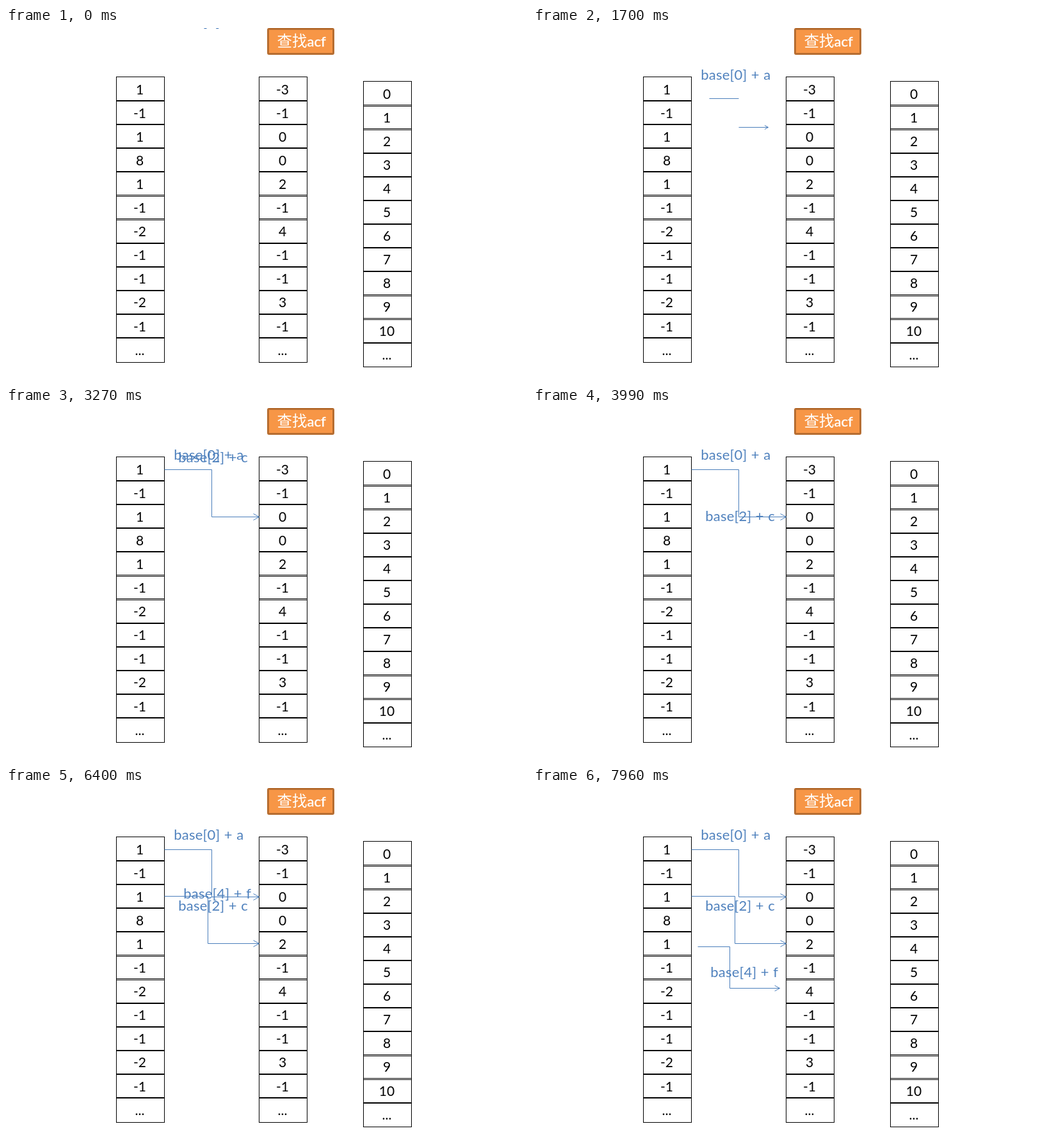
Write an HTML page that moves like this. It is 814x551 px and loops after 8 s.

```html
<!DOCTYPE html>
<html lang="zh">
<head>
<meta charset="utf-8">
<title>Double array lookup</title>
<style>
  html, body { margin: 0; width: 100%; height: 100%; overflow: hidden; background: #fff; }
  svg { display: block; width: 100%; height: 100%; }
  text { font-family: Lato, "Open Sans", sans-serif; }
  .cell { font-size: 21px; text-anchor: middle; fill: #000; }
  .label { font-size: 22px; letter-spacing: .2px; word-spacing: .6px; fill: #4f81bd; }
  .arrow { fill: none; stroke: #4a7ebb; stroke-width: 1; }
  .title { fill: #fff; font-size: 22px; stroke: #fff; stroke-width: .4; }
  .han { font-family: "Noto Sans CJK SC", "Noto Sans CJK", sans-serif; font-size: 23.5px; font-weight: 300; stroke: none; }
</style>
</head>
<body>
<svg id="stage" viewBox="0 0 814 551">
  <g id="tables"></g>
  <rect x="409.5" y="1.5" width="102" height="39" rx="1.5" fill="#f79646" stroke="#b66d31" stroke-width="3"/>
  <text class="title han" x="423.5" y="29">查找</text>
  <text class="title" x="470.5" y="28.5">acf</text>
  <g id="arrows"></g>
  <g id="labels"></g>
</svg>
<script>
const LOOP = 8000, TICK = 78, ZOOM_TICKS = 13.15;
const byId = id => document.getElementById(id);

function add(parent, tag, attrs, text) {
  const el = document.createElementNS("http://www.w3.org/2000/svg", tag);
  for (const key in attrs) el.setAttribute(key, attrs[key]);
  if (text) el.textContent = text;
  return parent.appendChild(el);
}

// Stacked cells; rounding jumps leave a gap in the two borders before them.
function drawColumn(x, top, jumps, values) {
  const g = byId("tables"), right = x + 75, bottom = top + 447;
  const hline = y => add(g, "rect", { x, y, width: 76, height: 1 });
  hline(top);
  hline(bottom);
  for (const side of [x, right]) add(g, "rect", { x: side, y: top, width: 1, height: 448 });
  for (let i = 0; i < values.length - 1; i++) {
    const y = top + 37 * (i + 1) + jumps.filter(j => i >= j).length;
    const split = jumps.some(j => i === j - 1 || i === j - 2);
    hline(y);
    hline(y + (split ? 2 : 1));
  }
  values.forEach((value, i) =>
    add(g, "text", { class: "cell", x: x + 37, y: top + 27.5 + 37.1 * i }, value));
}

drawColumn(172, 76, [6], [1, -1, 1, 8, 1, -1, -2, -1, -1, -2, -1, "..."].map(String));
drawColumn(395, 76, [6], [-3, -1, 0, 0, 2, -1, 4, -1, -1, 3, -1, "..."].map(String));
drawColumn(558, 83, [2, 10], [0, 1, 2, 3, 4, 5, 6, 7, 8, 9, 10, "..."].map(String));

// Each label drops to y at a steady speed, reaching it at tick "land"; its arrow then zooms in.
const steps = [
  { text: "base[0] + a", x: 262.3, y: 73, speed: 5.8, land: 14.3, zoom: 13.85, cy: 133, bend: 0 },
  { text: "base[2] + c", x: 269.3, y: 184.5, speed: 10.2, land: 52.5, zoom: 52.85, cy: 206.5, bend: -6 },
  { text: "base[4] + f", x: 277.3, y: 288, speed: 14.4, land: 90.5, zoom: 90.55, cy: 281, bend: -16 }
];
for (const step of steps) {
  step.arrow = add(byId("arrows"), "path", { class: "arrow" });
  step.label = add(byId("labels"), "text", { class: "label", x: step.x }, step.text);
}

const crisp = v => Math.floor(v) + .5;

function arrowPath(step, s) {
  if (s <= 0) return "";
  const cx = 321.5;
  const left = crisp(cx - 74 * s), right = crisp(cx + 73.5 * s);
  const mid = crisp(cx + step.bend * s);
  const y1 = crisp(step.cy - 37 * s), y2 = crisp(step.cy + 37 * s);
  const w = 9 * s, h = 5 * s;
  // The thin upright is lost while the arrow is still small.
  const upright = s < .65 ? "M" : "L";
  return `M${left} ${y1}H${mid}${upright}${mid} ${y2}H${right}` +
    `M${right - w} ${y2 - h}L${right} ${y2}L${right - w} ${y2 + h}`;
}

function render(t) {
  const tick = Math.floor((t + 16) / TICK);
  for (const step of steps) {
    const y = step.y - step.speed * Math.max(0, step.land - tick);
    step.label.setAttribute("y", y + 7.5);
    step.arrow.setAttribute("d", arrowPath(step, Math.min(1, (tick - step.zoom) / ZOOM_TICKS)));
  }
}

const start = performance.now();
function loop() {
  render((performance.now() - start) % LOOP);
  requestAnimationFrame(loop);
}
render(0);
requestAnimationFrame(loop);
</script>
</body>
</html>
```
